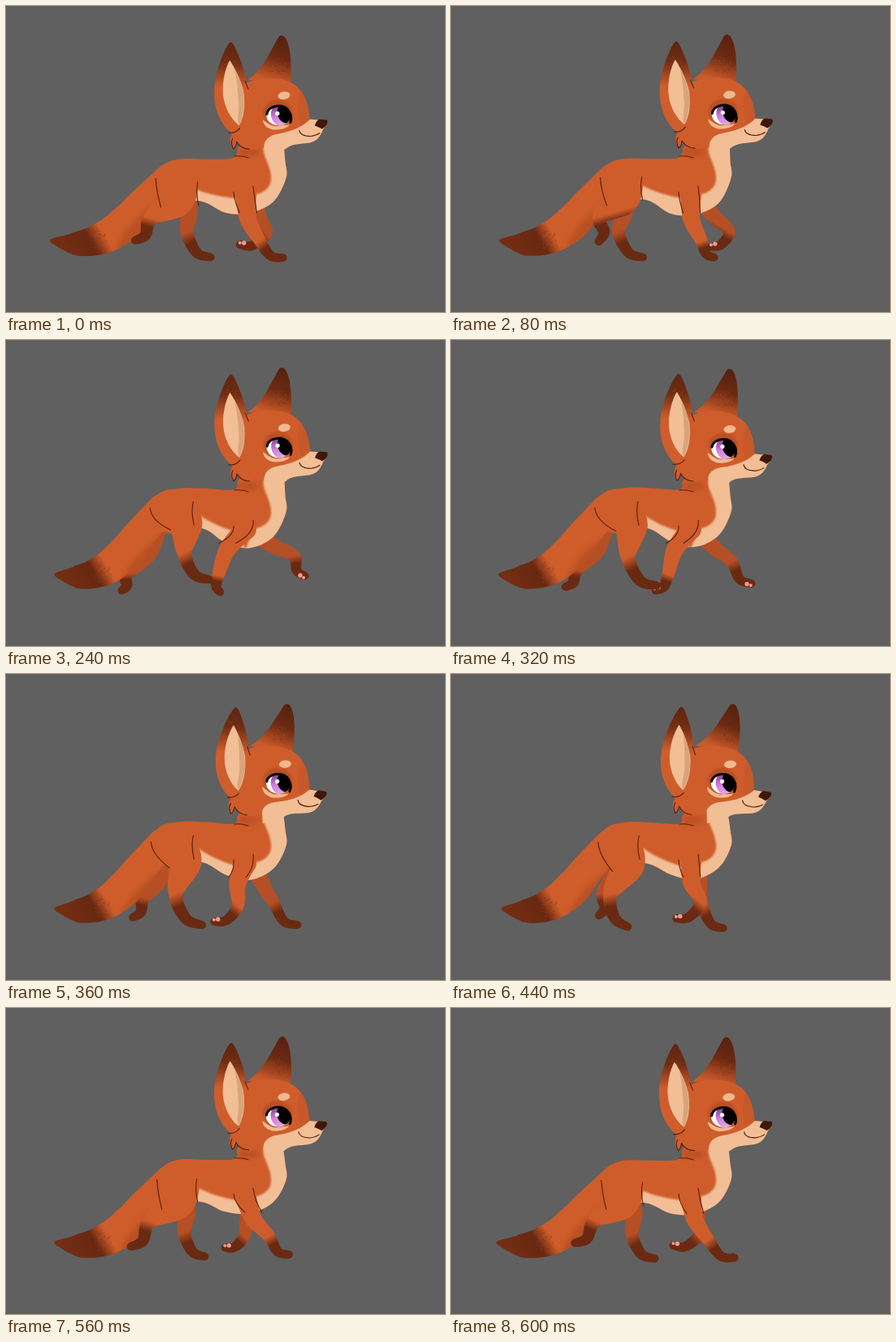
These frames come from a looping animation (540 by 377 pixels, 0.68 s). An HTML page:

```html
<!DOCTYPE html>
<html lang="en">
<head>
<meta charset="utf-8">
<title>Walking fox</title>
<style>
  html, body { margin: 0; width: 100%; height: 100%; overflow: hidden; background: #606060; }
  svg { display: block; width: 100%; height: 100%; }
  .line { fill: none; stroke: #5b1d0c; stroke-width: 1.1; stroke-linecap: round; stroke-linejoin: round; }
  .speck { fill: none; stroke-width: 1.3; stroke-linecap: round; opacity: .5; }
</style>
</head>
<body>
<svg viewBox="0 0 540 377">
  <defs>
    <filter id="soft1" x="-20%" y="-20%" width="140%" height="140%"><feGaussianBlur stdDeviation=".8"/></filter>
    <filter id="soft3" x="-40%" y="-40%" width="180%" height="180%"><feGaussianBlur stdDeviation="3"/></filter>
    <linearGradient id="tailFill" gradientUnits="userSpaceOnUse" x1="60" y1="322" x2="122" y2="285">
      <stop offset="0" stop-color="#7a3015"/><stop offset=".75" stop-color="#682811"/><stop offset="1" stop-color="#cf5d2b"/>
    </linearGradient>
    <linearGradient id="earFill" gradientUnits="userSpaceOnUse" x1="0" y1="46" x2="0" y2="100">
      <stop offset="0" stop-color="#5f2611"/><stop offset=".42" stop-color="#6f2c13"/><stop offset="1" stop-color="#cf5d2b"/>
    </linearGradient>
    <linearGradient id="farEarFill" gradientUnits="userSpaceOnUse" x1="344" y1="36" x2="328" y2="92">
      <stop offset="0" stop-color="#55200e"/><stop offset=".5" stop-color="#6b2a12"/><stop offset="1" stop-color="#c95a2a"/>
    </linearGradient>
    <linearGradient id="iris" x1="0" y1="0" x2="0" y2="1">
      <stop offset="0" stop-color="#7c3f86"/><stop offset=".45" stop-color="#cf7dd8"/><stop offset="1" stop-color="#e6a9ec"/>
    </linearGradient>
    <clipPath id="torsoClip"><path id="torsoEdge"/></clipPath>
    <clipPath id="tailClip"><path id="tailEdge"/></clipPath>
    <clipPath id="eyeClip"><ellipse cx="335.5" cy="134.5" rx="15" ry="12.5"/></clipPath>
  </defs>
  <rect width="540" height="377" fill="#606060"/>

  <g id="farLegs"></g>

  <path id="tail" fill="url(#tailFill)"/>
  <g clip-path="url(#tailClip)">
    <g id="tailMarks">
      <ellipse cx="166" cy="276" rx="46" ry="14" transform="rotate(-48 166 276)" fill="#a9481f" opacity=".6" filter="url(#soft3)"/>
    </g>
  </g>

  <path id="torso" fill="#cf5d2b"/>
  <g clip-path="url(#torsoClip)">
    <ellipse cx="298" cy="180" rx="14" ry="5" fill="#a8431c" opacity=".5" filter="url(#soft3)"/>
    <g fill="#f2be96" filter="url(#soft1)"><path id="belly"/><path id="chest"/></g>
  </g>
  <path class="line" d="M281 185Q290 184 298 187"/>

  <g id="nearLegs"></g>
  <path id="folds" class="line"/>

  <g id="head">
    <path fill="url(#farEarFill)" d="M297 91C308 84 316 72 321 64L334 40C336 35 341 34 344 40C349 48 352 68 350 96Z"/>
    <g id="farEarSpecks"></g>
    <path fill="#f2be96" d="M374 139L385 140L394 146L390 152C387 160 383 166 374 168C362 170 351 169 344 176L320 185L317 158L355 145Z"/>
    <path fill="#cf5d2b" d="M290 98C308 86 345 84 361 102C370 112 373 126 374 139C366 148 352 154 336 157C324 159 318 164 317 175L300 177C292 176 287 172 284 167C284 171 282 174 280 176C276 170 275 164 278 158L275 150Z"/>
    <path fill="#b04c24" opacity=".25" d="M362 104C370 112 373 126 374 139L363 145C358 130 358 115 362 104"/>
    <ellipse cx="334.5" cy="131" rx="18" ry="16" fill="#a9461e" opacity=".55" filter="url(#soft1)"/>
    <path fill="#f0b98f" d="M316 140C320 142 324 147 332 148L349 146C345 151 336 153 328 152C321 150 317 147 316 140Z"/>
    <g clip-path="url(#eyeClip)">
      <rect x="318" y="120" width="36" height="30" fill="#fff"/>
      <ellipse cx="337" cy="135" rx="10.5" ry="13.5" fill="url(#iris)" transform="rotate(-20 337 135)"/>
      <ellipse cx="344" cy="132" rx="10" ry="12.5" fill="#000" transform="rotate(-20 344 132)"/>
    </g>
    <path d="M321 133C322 125 331 122 339 123C348 125 353 135 350 143" fill="none" stroke="#080404" stroke-width="3" stroke-linecap="round"/>
    <circle cx="334" cy="132" r="2.6" fill="#fff"/>
    <ellipse cx="342" cy="110" rx="7.5" ry="4.8" fill="#f0b98f" transform="rotate(-8 342 110)"/>
    <path fill="#40170b" d="M380 147C381 143 383 140 386 139L395 140C397 143 394 148 389 151C386 149 383 148 380 147Z"/>
    <path class="line" d="M361 153C362 159 368 160 375 160Q382 159 386 156"/>
    <path fill="url(#earFill)" d="M275 45C269 52 262 70 258 88C253 113 258 140 277 156C288 155 297 134 298 112C297 90 290 68 281 50C279 46 277 44 275 45Z"/>
    <g id="earSpecks"></g>
    <path fill="#f2be96" d="M275 67C269 78 266 95 267 108C268 124 277 140 287 147C293 138 295 120 292 104C288 88 279 72 275 67Z"/>
    <path fill="#d8a47c" d="M281 77C288 88 293 106 293 120C292 132 290 140 287 146C283 140 288 130 286 114Q285 96 281 77Z"/>
    <path class="line" d="M294 92L298 102M274 156Q283 157 288 150M279 163Q276 169 280 176Q283 174 284 167Q289 176 300 176"/>
  </g>
</svg>
<script>
const DARK = '#6a2a12', ORANGE = '#cf5d2b', SHADE = '#b54f25';
const STEPS = 14, LOOP = 680;
const holdOf = step => [6, 8, 13].includes(step) ? 80 : 40;

const $ = id => document.getElementById(id);
const setPath = (id, d) => $(id).setAttribute('d', d);
const fix = v => v.toFixed(2);

function make(parent, tag, attrs) {
  const node = document.createElementNS('http://www.w3.org/2000/svg', tag);
  for (const name in attrs) node.setAttribute(name, attrs[name]);
  return parent.appendChild(node);
}

// Mean plus one [cosine, sine] pair per harmonic of the walk cycle
const wave = (t, mean, ...pairs) => pairs.reduce(
  (sum, [a, b], i) => sum + a * Math.cos((i + 1) * t) + b * Math.sin((i + 1) * t), mean);

const offset = ([x, y], dx, dy) => [x + dx, y + dy];

// Point between a and b, pushed sideways in proportion to their distance
function bend([ax, ay], [bx, by], along, side) {
  const dx = bx - ax, dy = by - ay;
  return [ax + dx * along - dy * side, ay + dy * along + dx * side];
}

function spline(a, b, c, d, t) {
  return b + t / 2 * (c - a + t * (2 * a - 5 * b + 4 * c - d + t * (3 * (b - c) + d - a)));
}

// Smooth closed curve through the points
function blob(pts) {
  const n = pts.length, at = i => pts[(i + n) % n];
  let d = 'M' + at(0);
  for (let i = 0; i < n; i++) {
    const [a, b, c, e] = [at(i - 1), at(i), at(i + 1), at(i + 2)];
    d += 'C' + [b[0] + (c[0] - a[0]) / 6, b[1] + (c[1] - a[1]) / 6,
                c[0] - (e[0] - b[0]) / 6, c[1] - (e[1] - b[1]) / 6, c[0], c[1]].map(fix);
  }
  return d + 'Z';
}

// Tapered limb: overlapping discs along a spline
function limbPath(joints, radii) {
  const last = joints.length - 1, clamp = i => Math.max(0, Math.min(last, i));
  let d = '';
  for (let s = 0; s <= last * 24; s++) {
    const k = Math.min(last - 1, Math.floor(s / 24)), t = s / 24 - k;
    const along = axis => spline(...[-1, 0, 1, 2].map(o => joints[clamp(k + o)][axis]), t);
    const r = radii[k] + (radii[k + 1] - radii[k]) * t;
    d += `M${fix(along(0) - r)} ${fix(along(1))}a${r} ${r} 0 1 0 ${2 * r} 0a${r} ${r} 0 1 0 ${-2 * r} 0`;
  }
  return d;
}

const bodyAt = t => ({
  rumpX: wave(t, 190, [3.6, -1.3], [-1.5, 0]),
  rumpY: wave(t, 195.5, [3, 0]),
  back: wave(t, 185.6, [3.2, .9]),
  bellyX: wave(t, 231, [3, 0]),
  bellyTop: wave(t, 214.6, [8.7, 0], [2.4, 0]),
  bellyLow: wave(t, 236, [4.6, 0]),
  bellyMid: wave(t, 251.4, [3.3, 3]),
  chest: wave(t, 255, [0, 2.7]),
  tailX: wave(t, 6.7, [-2.1, 0], [-3.7, 0]),
  headX: wave(t, -.15, [0, .6]),
  headY: wave(t, -.8, [.4, -1.1], [.7, .9]),
  turn: wave(t, 1.3, [-1.1, -2.2], [0, 1.4])
});

// sway: how far the root follows the ankle; mid: elbow or knee as [along, side]
const nearFront = {
  radii: [13, 10.5, 7.5, 6, 4.8], mid: [.5, .1], sway: 0, pads: true,
  root: () => [295, 233],
  ankle: t => [wave(t, 299.6, [22.5, -17], [-10, 6]), wave(t, 286, [0, 5.8], [2.9, 0])],
  toe: t => [wave(t, 306, [44.6, -5.8], [-9.7, -7.9]), wave(t, 307, [.7, 4.8], [2.5, -.8])]
};
const farFront = {
  radii: [11, 9, 7.5, 6, 4.8], mid: [.5, .03], sway: .15, pads: true,
  root: () => [304, 242],
  ankle: t => [wave(t, 326.6, [-12.6, 30.6], [6, .7]), wave(t, 277.3, [3.3, -8.6], [-1, 4.9])],
  toe: t => [wave(t, 322, [-41, 23.5], [6.6, 7.4]), wave(t, 297.7, [-2.9, -8.2], [-.6, 7.3])]
};
const nearHind = {
  radii: [27, 21, 8.5, 7, 5], mid: [.36, -.22], sway: 0,
  root: body => [body.rumpX + 18.5, body.back + 28],
  ankle: t => [wave(t, 193, [-20, 7.5], [4.7, -2.6]), wave(t, 263, [-2.9, -5.4], [1, 2.5])],
  toe: t => [wave(t, 198.6, [-47, 14.6], [7.3, 2.6]), wave(t, 296.3, [-7, -8], [-.6, 4.6])]
};
const farHind = {
  radii: [17, 11, 8, 6.5, 4.8], mid: [.5, -.15], sway: .4,
  root: () => [204, 228],
  ankle: t => [wave(t, 191, [34, -14.7], [-2.3, 5]), wave(t, 279, [-2, 6.6], [1.8, -4.3])],
  toe: t => [wave(t, 204, [55.6, -9.6], [-7.8, 3.4]), wave(t, 306.4, [2.7, 5.5], [.5, -2.7])]
};

function jointsAt(leg, t, body) {
  const ankle = leg.ankle(t), toe = leg.toe(t), base = leg.root(body);
  const root = offset(base, leg.sway * (ankle[0] - base[0]), 0);
  const heel = bend(ankle, toe, .62, .2 * Math.sign(toe[0] - ankle[0]));
  return [root, bend(root, ankle, ...leg.mid), ankle, heel, toe];
}

// Returns a function that poses the leg and reports its joints
function addLeg(layer, leg, color) {
  const id = 'leg' + document.querySelectorAll('.leg').length;
  const grad = make(document.querySelector('defs'), 'linearGradient', { id, gradientUnits: 'userSpaceOnUse' });
  make(grad, 'stop', { offset: 0, 'stop-color': color });
  make(grad, 'stop', { offset: 1, 'stop-color': DARK });
  const limb = make($(layer), 'path', { class: 'leg', fill: `url(#${id})` });
  const pads = leg.pads ? [2, 2.7].map(r => make($(layer), 'circle', { r, fill: '#ee9a93' })) : [];

  return (t, body) => {
    const joints = jointsAt(leg, t, body), [, , ankle, heel, toe] = joints;
    limb.setAttribute('d', limbPath(joints, leg.radii));
    const [x2, y2] = bend(ankle, heel, .5, 0);
    const ends = { x1: ankle[0], y1: ankle[1], x2, y2 };
    for (const name in ends) grad.setAttribute(name, ends[name]);

    const soleShows = toe[1] < 300 || toe[0] < ankle[0] - 8;
    const length = Math.hypot(toe[0] - heel[0], toe[1] - heel[1]);
    pads.forEach((pad, i) => {
      const [cx, cy] = bend(toe, heel, i * 5 / length, -2.5 / length);
      pad.setAttribute('cx', cx);
      pad.setAttribute('cy', cy);
      pad.setAttribute('visibility', soleShows ? 'visible' : 'hidden');
    });
    return joints;
  };
}

let seed = 7;
const random = () => (seed = seed * 16807 % 2147483647) / 2147483647;

function addSpecks(id, cx, cy, rx, ry) {
  for (const stroke of [DARK, '#b04c22']) {
    let d = '';
    for (let i = 0; i < 28; i++) {
      const a = random() * 2 * Math.PI, r = Math.sqrt(random());
      d += `M${fix(cx + rx * r * Math.cos(a))} ${fix(cy + ry * r * Math.sin(a))}h.1`;
    }
    make($(id), 'path', { class: 'speck', stroke, d });
  }
}

function drawTail(body) {
  const spine = [[196, 218], [169, 245], [146, 269], [119, 286], [88, 293], [54, 289]];
  const bent = spine.map((p, i) => {
    const w = i / (spine.length - 1);
    return offset(p, w * body.tailX + (1 - w) * (body.rumpX - 192), (1 - w) * (body.rumpY - 200));
  });
  const tail = limbPath(bent, [18, 20, 22, 20, 15, 1]);
  setPath('tail', tail);
  setPath('tailEdge', tail);
  $('tailFill').setAttribute('gradientTransform', `translate(${body.tailX} 0)`);
  $('tailMarks').setAttribute('transform', `translate(${body.tailX} 0)`);
}

function drawTorso({ rumpX, rumpY, back, bellyX, bellyTop, bellyLow, bellyMid, chest, headX, headY }) {
  const neck = (x, y) => [x + 2 * headX, y + headY];
  const torso = blob([
    neck(300, 160), neck(286, 174), [284, 182], [276, (back + 187) / 2], [245, back], [212, back],
    [rumpX - 3, rumpY], [rumpX - 10, rumpY + 14], [rumpX + 5, rumpY + 42],
    [240, bellyLow], [270, bellyMid], [300, chest], [329, chest - 14],
    [344.5, 212], [343.5, 192], neck(342, 172), neck(340, 155)]);
  setPath('torso', torso);
  setPath('torsoEdge', torso);
  setPath('belly', `M${bellyX} ${bellyTop}Q${bellyX + 18} ${(bellyTop + 236) / 2 + 3} 284 237L304 275H${bellyX - 4}Z`);
  setPath('chest', `M${neck(330, 150)}Q${neck(314, 160)} 317 180C319 190 327 200 326 215Q324 229 304 233L290 270H360V150Z`);
}

function drawFolds({ rumpX, rumpY, bellyX, bellyTop }, elbow, knee) {
  const curve = (from, by, to) => `M${from}Q${by} ${to}`;
  setPath('folds',
    curve([rumpX - 8, rumpY + 14], [rumpX - 7, rumpY + 30], offset(knee, -18, 8)) +
    curve([bellyX + 2, bellyTop - 9], [bellyX - 1, bellyTop + 4], [bellyX + 3, bellyTop + 20]) +
    curve([280, 229], [281, 241], offset(elbow, -10.5, -8)) +
    curve([304, 222], [306, 238], offset(elbow, 10.5, -8)));
}

const legs = [
  addLeg('farLegs', farFront, SHADE),
  addLeg('farLegs', farHind, SHADE),
  addLeg('nearLegs', nearFront, ORANGE),
  addLeg('nearLegs', nearHind, ORANGE)
];
addSpecks('tailMarks', 112, 289, 11, 16);
addSpecks('farEarSpecks', 334, 74, 13, 10);
addSpecks('earSpecks', 275, 74, 9, 12);

function draw(step) {
  const t = step / STEPS * 2 * Math.PI, body = bodyAt(t);
  $('head').setAttribute('transform', `translate(${body.headX} ${body.headY}) rotate(${body.turn} 335 134)`);
  drawTail(body);
  drawTorso(body);
  const [, , front, hind] = legs.map(pose => pose(t, body));
  drawFolds(body, front[1], hind[1]);
}

function stepAt(ms) {
  let step = 0;
  for (let left = ms % LOOP; left >= holdOf(step); step++) left -= holdOf(step);
  return step;
}

const start = performance.now();
let shown = -1;
function tick() {
  const step = stepAt(performance.now() - start);
  if (step !== shown) draw(shown = step);
  requestAnimationFrame(tick);
}
tick();
</script>
</body>
</html>
```
